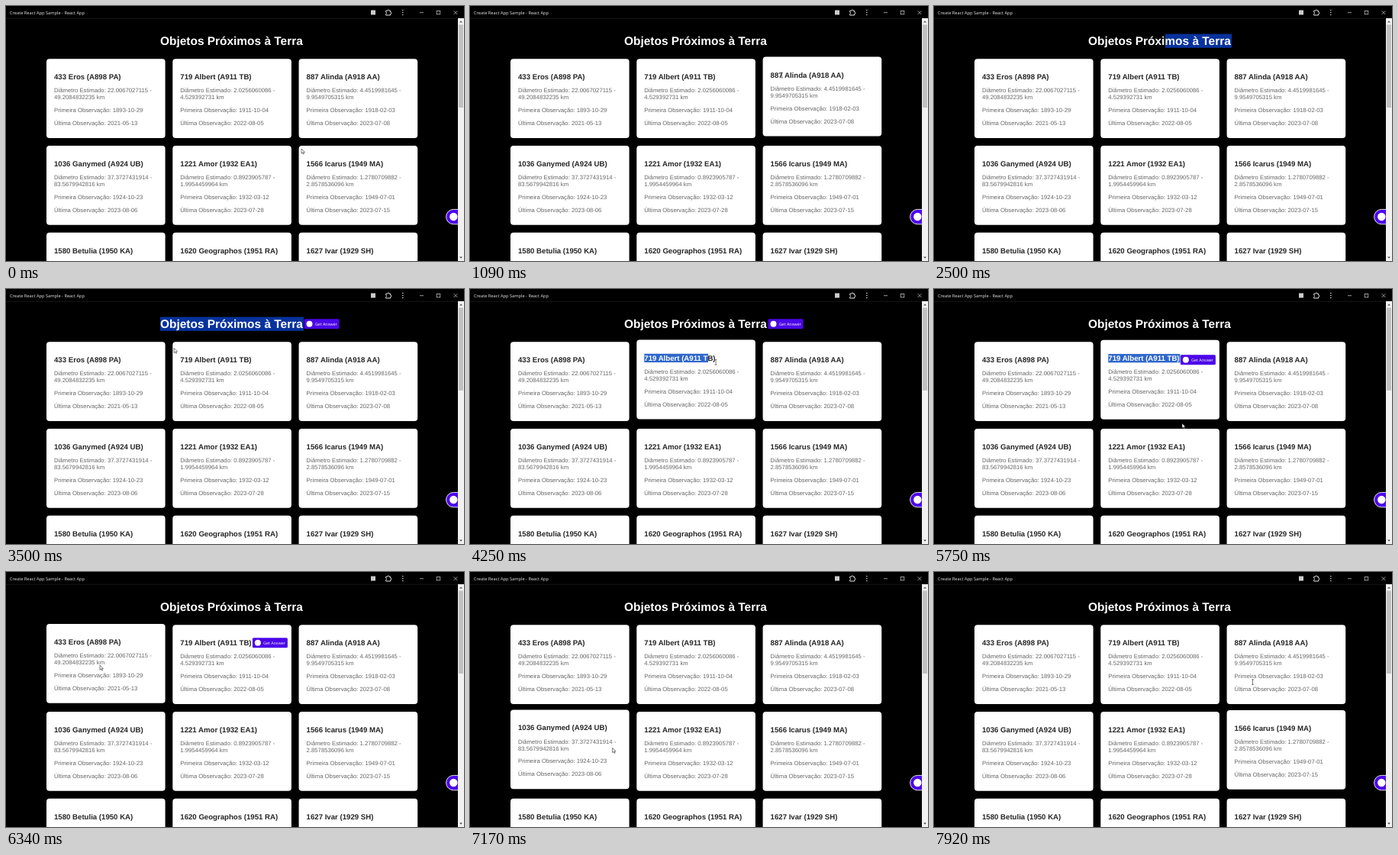
Write an HTML page that moves like this. It is 600 by 334 pixels and loops after 8 s.

```html
<!DOCTYPE html>
<html lang="pt">
<head>
<meta charset="utf-8">
<title>Objetos Próximos à Terra</title>
<style>
html, body { margin: 0; width: 100%; height: 100%; overflow: hidden; background: #000; }
svg { display: block; width: 600px; height: 334px; }
text { font-family: "Liberation Sans", Arial, sans-serif; text-rendering: geometricPrecision; }
.title { font-size: 15.44px; font-weight: bold; fill: #fff; }
.name { font-size: 9.65px; font-weight: bold; fill: #262626; }
.info { font-size: 7.72px; fill: #666; }
.ui { font-family: "Open Sans", "Noto Sans", sans-serif; font-size: 5.7px; fill: #e4e4e4; }
.label { font-size: 5.4px; fill: #fff; }
</style>
</head>
<body>
<svg id="stage" viewBox="0 0 600 334" xmlns="http://www.w3.org/2000/svg">
  <defs>
    <clipPath id="nameClip"><rect id="nameClipRect" x="228.3" y="80" width="0" height="20"/></clipPath>
    <g id="answer">
      <rect x=".3" y=".3" width="46" height="13" rx="1.5" fill="#4c06e8"/>
      <circle cx="7.3" cy="6.8" r="4" fill="#fff"/>
      <text class="ui label" x="14.5" y="8.7">Get Answer</text>
    </g>
  </defs>
  <rect width="600" height="334"/>

  <g fill="none" stroke="#e4e4e4" stroke-width=".65">
    <path d="M0 16.3H592" stroke="#222"/>
    <text class="ui" x="5" y="10.6" stroke="none">Create React App Sample - React App</text>
    <rect x="478" y="5.5" width="6" height="6" fill="#ccc" stroke="none"/>
    <path d="M497.7 6.2H499.6A1.2 1.2 0 0 1 502 6.2H503.7V8A1.2 1.2 0 0 1 503.7 10.4V12H497.7V10.3A1.2 1.2 0 0 0 497.7 8Z" stroke-width="1"/>
    <path d="M519.8 5.6v5.9" stroke-width="1.5" stroke-linecap="round" stroke-dasharray="0 2.9"/>
    <path d="M542 8.7H547M586.6 6.2l4.8 4.8m0 -4.8l-4.8 4.8"/>
    <rect x="564.2" y="6.3" width="4.6" height="4.6"/>
  </g>

  <rect id="titleMark" y="36.6" width="0" height="18.2" fill="#08329c"/>
  <text class="title" x="202" y="51.3">Objetos Próximos à Terra</text>
  <g id="cards"></g>

  <rect x="576.6" y="266.4" width="26" height="19.4" rx="9.7" fill="#4c06e8" stroke="#fff" stroke-width=".9"/>
  <circle cx="586.3" cy="276" r="5.2" fill="#fff"/>
  <rect x="592" y="16" width="8" height="318" fill="#f1f1f1"/>
  <rect x="593" y="24.5" width="6" height="108.5" fill="#c1c1c1"/>
  <path d="M594 21.6l2 -2.2l2 2.2zM594 328.6l2 2.2l2 -2.2z" fill="#505050"/>

  <use id="titleAnswer" href="#answer" x="390.2" y="39"/>
  <use id="cardAnswer" href="#answer" x="322.6" y="86"/>
  <path id="arrow" d="M0 0V6.2L1.5 4.9L2.5 7L3.4 6.6L2.5 4.6H4.4Z" fill="#fff" stroke="#222" stroke-width=".6"/>
  <path id="beam" d="M-1.4 -3.3H1.4M0 -3.3V3.3M-1.4 3.3H1.4" fill="none" stroke="#444" stroke-width=".7"/>
</svg>
<script>
const LOOP = 8000, STEP = LOOP / 96, LIFT = 2.6, FADE = 250;
const $ = id => document.getElementById(id);

// name | diameter range | first seen | last seen
const objects = `433 Eros (A898 PA)|22.0067027115 - 49.2084832235|1893-10-29|2021-05-13
719 Albert (A911 TB)|2.0256060086 - 4.529392731|1911-10-04|2022-08-05
887 Alinda (A918 AA)|4.4519981645 - 9.9549705315|1918-02-03|2023-07-08
1036 Ganymed (A924 UB)|37.3727431914 - 83.5679942816|1924-10-23|2023-08-06
1221 Amor (1932 EA1)|0.8923905787 - 1.9954459964|1932-03-12|2023-07-28
1566 Icarus (1949 MA)|1.2780709882 - 2.8578536096|1949-07-01|2023-07-15
1580 Betulia (1950 KA)
1620 Geographos (1951 RA)
1627 Ivar (1929 SH)`.split('\n').map(row => row.split('|'));

// card, pointer enters, pointer leaves
const hovers = [
  [5, 0, 560], [2, 680, 1580], [1, 3580, 4640], [1, 4800, 5010], [2, 5010, 5440], [1, 5480, 5700],
  [0, 6215, 6680], [3, 6780, 7260], [4, 7350, 7570], [5, 7600, 7840]
];

// time, x, y
const pointer = [
  [0, 387, 187], [250, 430, 215], [700, 438, 140], [1083, 408.5, 90.5], [1667, 398, 43],
  [2000, 395, 42.5], [2160, 395, 42.5], [2500, 303, 46], [3083, 203, 46], [3667, 227, 90],
  [3833, 228, 91], [4250, 322, 96], [4583, 322, 95], [4917, 356.5, 149.5], [5167, 420, 130],
  [5750, 325, 176], [6000, 270, 176], [6333, 123, 122], [6750, 95, 182], [7250, 205, 240],
  [7750, 420, 195], [7917, 417.5, 144]
];
const beamSpans = [[900, 1400], [2160, 3250], [3660, 4580], [7830, 8000]];
const titleStart = [[2160, 390], [2500, 303], [2917, 221], [3083, 202]];
const nameEnd = [[3833, 228.3], [4250, 312], [4333, 322.4]];

function add(parent, tag, attrs, content) {
  const node = document.createElementNS('http://www.w3.org/2000/svg', tag);
  for (const key in attrs) node.setAttribute(key, attrs[key]);
  if (content) node.textContent = content;
  return parent.appendChild(node);
}

const cards = objects.map(([name, range, first, last], i) => {
  const x = 53 + i % 3 * 165.3, y = 69.2 + Math.floor(i / 3) * 113.8;
  const group = add($('cards'), 'g', {});
  const line = (cls, dy, content) => add(group, 'text', { class: cls, x: x + 10, y: y + dy }, content);
  add(group, 'rect', { x, y, width: 155.6, height: 103.8, rx: 4, fill: '#fff' });
  line('name', 27, name);
  if (range) {
    const [from, to] = range.split(' - ');
    line('info', 44.2, `Diâmetro Estimado: ${from} -`);
    line('info', 53.2, `${to} km`);
    line('info', 70.1, `Primeira Observação: ${first}`);
    line('info', 87.1, `Última Observação: ${last}`);
  }
  return group;
});

const nameMark = add(cards[1], 'rect', { x: 228.3, y: 87.4, width: 0, height: 11.3, fill: '#2f67cb' });
add(cards[1], 'text', { class: 'name', x: 228.3, y: 96.2, 'clip-path': 'url(#nameClip)', style: 'fill:#fff' }, objects[1][0]);

const clamp = v => Math.min(1, Math.max(0, v));
const smooth = v => (v = clamp(v), v * v * (3 - 2 * v));
const within = (t, from, to) => t >= from && t < to;
const show = (node, on) => node.setAttribute('visibility', on ? 'visible' : 'hidden');

function track(table, t, column = 1) {
  const next = table.findIndex(row => row[0] > t);
  if (next < 0) return table[table.length - 1][column];
  if (next === 0) return table[0][column];
  const a = table[next - 1], b = table[next];
  return a[column] + (b[column] - a[column]) * (t - a[0]) / (b[0] - a[0]);
}

function draw(t) {
  cards.forEach((group, i) => {
    const raised = hovers.filter(([card]) => card === i).reduce((sum, [, on, off]) =>
      sum + smooth((t - on) / FADE) - smooth((t - off) / FADE), 0);
    group.setAttribute('transform', `translate(0 ${-LIFT * clamp(raised)})`);
  });

  const left = track(titleStart, t);
  $('titleMark').setAttribute('x', left);
  $('titleMark').setAttribute('width', within(t, 2160, 3740) ? 390 - left : 0);

  const width = within(t, 3830, 5830) ? track(nameEnd, t) - 228.3 : 0;
  for (const rect of [nameMark, $('nameClipRect')]) rect.setAttribute('width', width);

  show($('titleAnswer'), within(t, 3300, 4660));
  show($('cardAnswer'), within(t, 4660, 6410));

  const overText = beamSpans.some(([from, to]) => within(t, from, to));
  show($('arrow'), !overText);
  show($('beam'), overText);
  for (const id of ['arrow', 'beam'])
    $(id).setAttribute('transform', `translate(${track(pointer, t)} ${track(pointer, t, 2)})`);
}

const start = performance.now();
function tick() {
  const t = Math.max(0, performance.now() - start) % LOOP;
  draw(Math.floor(t / STEP) * STEP);
  requestAnimationFrame(tick);
}
tick();
</script>
</body>
</html>
```
